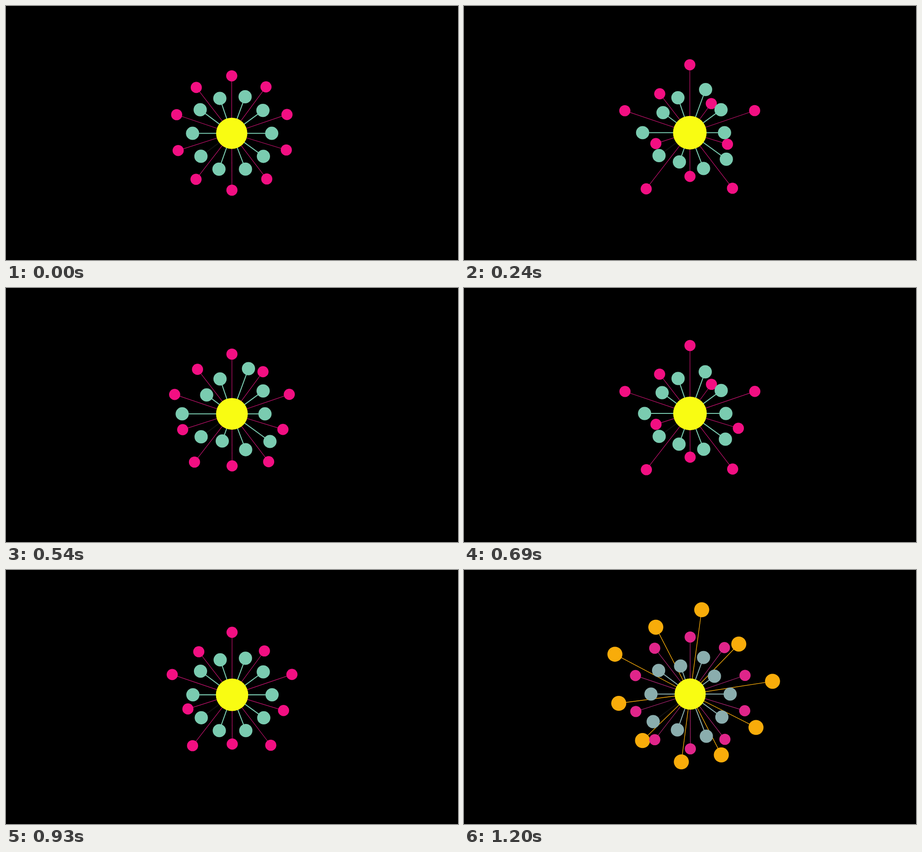
Write an HTML page with a canvas that moves like this. It is 998 px wide and 561 px high and loops after 1230 ms.

```html
<!DOCTYPE html>
<html lang="en">
<head>
<meta charset="utf-8">
<title>Pulsing burst</title>
<style>
  html, body { margin: 0; height: 100%; overflow: hidden; background: #000; }
  canvas { display: block; }
</style>
</head>
<body>
<canvas width="998" height="561"></canvas>
<script>
const ctx = document.querySelector('canvas').getContext('2d');
const LOOP = 1230, STEP = 30;

// Piecewise linear value at time t
function track(times, values, t) {
  if (t <= times[0]) return values[0];
  for (let i = 1; i < times.length; i++) {
    if (t <= times[i]) {
      const k = (t - times[i - 1]) / (times[i] - times[i - 1]);
      return values[i - 1] + (values[i] - values[i - 1]) * k;
    }
  }
  return values[values.length - 1];
}

// Two beats: quick attack, slow release
const beatTimes = [0, 110, 120, 360, 540, 600, 670, 690, 930, 1200];
const beats = {
  main:  [0.03, 1.02, 1, 0.6, 0.2, 0.07, 0.83, 0.8, 0.4, 0],
  late:  [-0.15, 1.02, 1, 0.6, 0.2, 0.07, 0.83, 0.8, 0.4, 0],
  short: [0, 1.02, 1, 0.6, 0.2, 0.07, 0.83, 0.8, 0.12, 0],
  weak:  [0, 1.02, 1, 0.42, 0.15, 0.05, 0.28, 0.26, 0.13, 0],
  soft:  [0, 1.02, 1, 0.44, 0.14, 0.05, 0.72, 0.68, 0.29, 0]
};

// angle, resting length, swing, beat
const pinks = [
  [-90, 126, 30, 'main'], [-53.6, 127.5, -59.5, 'short'],
  [-18.8, 128, 29, 'main'], [17, 126, -55, 'weak'],
  [52.5, 126, 36, 'main'], [89.8, 121, -30.5, 'late'],
  [127.8, 127.5, 37, 'main'], [162.2, 126, -59, 'main'],
  [198.7, 127.5, 30, 'main'], [232.3, 128, -27, 'soft']
];

// angle, resting length, first swing, second swing
const teals = [
  [-69.9, 86, 27, 0], [-36.3, 85.5, 0, -19], [0, 88.3, -20.4, 0],
  [36, 86.5, 23, 0], [69, 84.7, 0, 15], [109.6, 84, -27, 0],
  [143.3, 84.8, 0, 17], [180, 86.5, 31, 0], [216.8, 87, -23, 0],
  [251.2, 81.5, 0, -16]
];

// angle, final length
const oranges = [
  [-82.2, 188], [-45.8, 154], [-8.8, 184], [26.9, 163], [62.9, 151],
  [97.4, 151], [135.7, 147], [172.6, 159], [207.9, 188], [242.8, 166]
];

const mix = (a, b, k) =>
  `rgb(${a.map((v, i) => Math.round(v + (b[i] - v) * k)).join()})`;

function disc(x, y, r, color) {
  ctx.fillStyle = color;
  ctx.beginPath();
  ctx.arc(x, y, r, 0, Math.PI * 2);
  ctx.fill();
}

function spoke(angle, length, size, color, width, lineColor = color) {
  const a = angle * Math.PI / 180;
  const x = length * Math.cos(a), y = length * Math.sin(a);
  ctx.strokeStyle = lineColor;
  ctx.lineWidth = width;
  ctx.beginPath();
  ctx.moveTo(0, 0);
  ctx.lineTo(x, y);
  ctx.stroke();
  disc(x, y, size, color);
}

function draw(t) {
  ctx.setTransform(1, 0, 0, 1, 0, 0);
  ctx.fillStyle = '#000';
  ctx.fillRect(0, 0, 998, 561);
  ctx.translate(498.4 + t * 0.0008, 281.2 - t * 0.006);

  const fade = track([1050, 1200], [0, 1], t);
  const pink = mix([242, 15, 130], [224, 37, 138], fade);
  const pinkLine = mix([200, 18, 112], [190, 40, 125], fade);
  const teal = mix([122, 203, 176], [138, 173, 173], fade);

  if (t > 930) {
    const grow = track([930, 1020], [0, 175], t);
    for (const [angle, end] of oranges) {
      const long = end > 175;
      const settle = track([1020, 1080, 1140, 1200],
        long ? [0, 0.9, 1.8, 1] : [0, 0.85, 0.95, 1], t);
      spoke(angle, grow + (end - 175) * settle, 16.6, '#f8ac0a', 1.4);
    }
  }

  for (const [angle, rest, swing, beat] of pinks) {
    const length = rest + swing * track(beatTimes, beats[beat], t);
    spoke(angle, length, 12.3, pink, 1.2, pinkLine);
  }

  const first = track([0, 420, 905], [0, 1, 0], t);
  const second = track([930, 1200], [0, 1], t);
  teals.forEach(([angle, rest, a, b], i) =>
    spoke(angle, rest + a * first + b * second, 14.6, teal, 2.1,
      i === 6 ? '#121212' : teal));

  disc(0, 0, 34.4 + 3.4 * track(beatTimes, beats.main, t), '#f9fc12');
}

function frame() {
  draw(Math.floor(performance.now() % LOOP / STEP) * STEP);
  requestAnimationFrame(frame);
}
frame();
</script>
</body>
</html>
```
